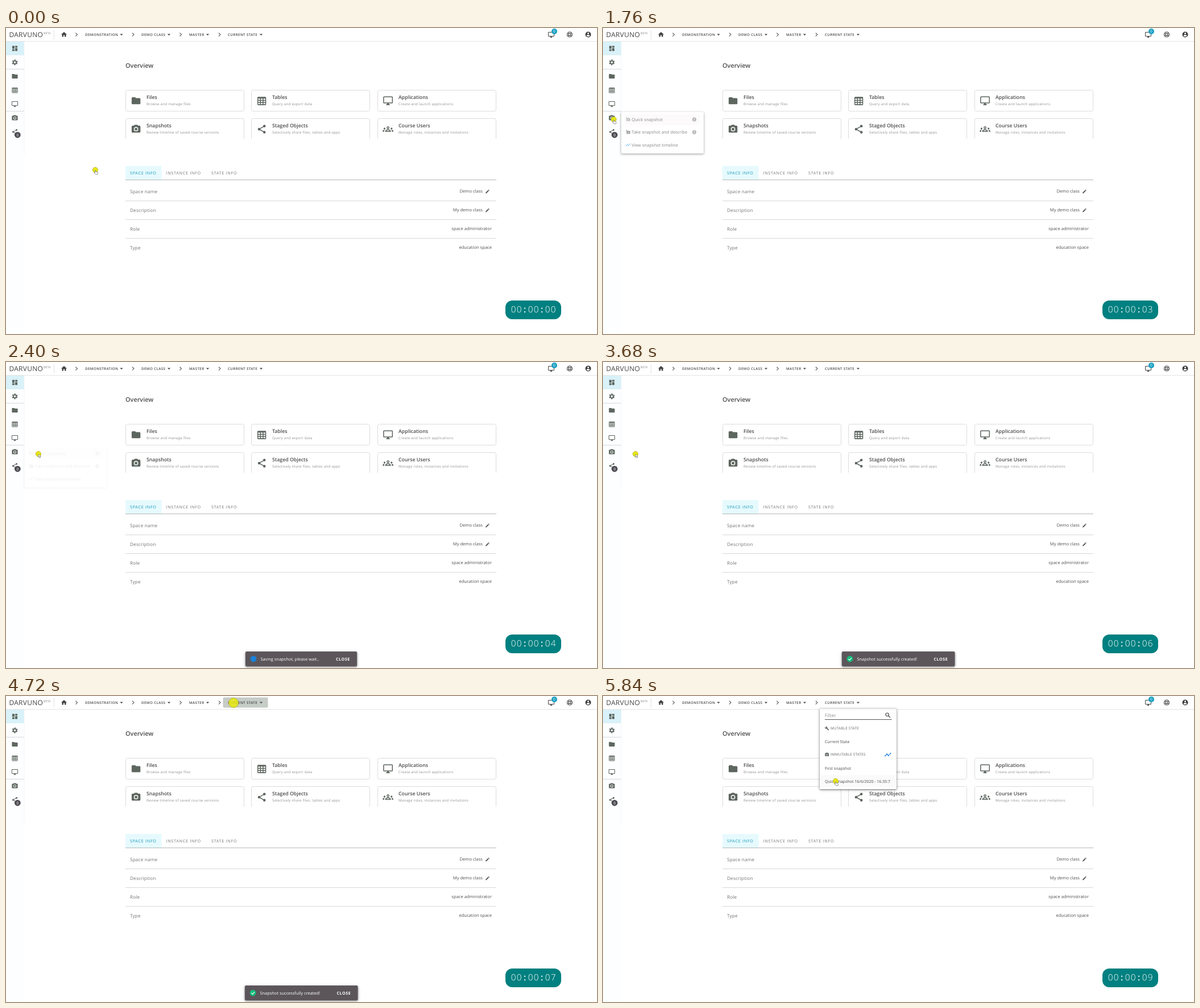
Animation of 1039 by 539 pixels, one loop 6000 ms. Source, as an HTML page:

```html
<!DOCTYPE html>
<html lang="en">
<head>
<meta charset="utf-8">
<title>Course overview</title>
<style>
  html, body { margin: 0; width: 100%; height: 100%; overflow: hidden; background: #fff; }
  svg { display: block; width: 100%; height: 100%; }
  text { font-family: "Open Sans", "Noto Sans", sans-serif; text-rendering: geometricPrecision; white-space: pre; }
  .shadow { filter: drop-shadow(0 1.5px 1.5px rgba(0, 0, 0, .4)) drop-shadow(0 1px 2.5px rgba(0, 0, 0, .25)); }
</style>
</head>
<body>
<svg id="stage" viewBox="0 0 1039 539" preserveAspectRatio="none"></svg>
<script>
const NS = 'http://www.w3.org/2000/svg';
const stage = document.getElementById('stage');
const LOOP = 6000, STEP = 80;
const INK = '#5d665f', DARK = '#4c4c4e';

function add(parent, tag, attrs = {}, content) {
  const el = document.createElementNS(NS, tag);
  for (const key in attrs) el.setAttribute(key, attrs[key]);
  if (content !== undefined) el.textContent = content;
  parent.appendChild(el);
  return el;
}
const group = (parent, attrs) => add(parent, 'g', attrs);
const rect = (parent, x, y, width, height, fill, more) =>
  add(parent, 'rect', { x, y, width, height, fill, ...more });
const circle = (parent, cx, cy, r, fill, more) =>
  add(parent, 'circle', { cx, cy, r, fill, ...more });
const line = (parent, d, stroke, width = 1, more) =>
  add(parent, 'path', { d, stroke, 'stroke-width': width, fill: 'none', ...more });
const label = (parent, x, y, str, size, fill = DARK, more) =>
  add(parent, 'text', { x, y, 'font-size': size, fill, ...more }, str);

// Icons live on a 24 x 24 grid; "f" is filled, "s" stroked with the given width.
const ring = (x, y, r) => `M${x - r} ${y}a${r} ${r} 0 1 0 ${2 * r} 0a${r} ${r} 0 1 0 ${-2 * r} 0z`;
const cells = [7, 12, 17].map(y => [4, 10, 16].map(x => `M${x} ${y}h4v3h-4z`).join('')).join('');
const ICONS = {
  dashboard: { f: 'M3 13h8V3H3zM3 21h8v-6H3zM13 21h8V11h-8zM13 3v6h8V3z' },
  folder: { f: 'M10 4H4q-2 0-2 2v12q0 2 2 2h16q2 0 2-2V8q0-2-2-2h-8z' },
  table: { f: 'M4 3h16q2 0 2 2v15q0 2-2 2H4q-2 0-2-2V5q0-2 2-2z' + cells },
  desktop: { f: 'M21 2H3q-2 0-2 2v12q0 2 2 2h7v2H8v2h8v-2h-2v-2h7q2 0 2-2V4q0-2-2-2zM21 16H3V4h18z' },
  camera: { f: 'M9 2L7.2 4H4q-2 0-2 2v12q0 2 2 2h16q2 0 2-2V6q0-2-2-2h-3.2L15 2z' + ring(12, 12, 5) + ring(12, 12, 3.2) },
  share: { f: ring(18, 5, 3) + ring(6, 12, 3) + ring(18, 19, 3), s: 'M18 5L6 12L18 19', w: 2 },
  people: {
    f: ring(4, 10.5, 2.1) + ring(20, 10.5, 2.1) + 'M0 18v-1.6q0-2.6 4.4-2.9q-1.4 1.3-1.2 4.5zM24 18v-1.6q0-2.6-4.4-2.9q1.4 1.3 1.2 4.5z',
    s: ring(12, 8.8, 2.3) + 'M6.5 17.2v-.8q1-3 5.5-3t5.5 3v.8z', w: 1.8
  },
  home: { f: 'M10 20v-6h4v6h5v-8h3L12 3 2 12h3v8z' },
  account: { f: ring(12, 12, 10) + ring(12, 8, 3) + 'M12 19.2c-2.5 0-4.7-1.3-6-3.2 0-2 4-3.1 6-3.1s6 1.1 6 3.1c-1.3 1.9-3.5 3.2-6 3.2z' },
  buoy: { s: ring(12, 12, 9) + ring(12, 12, 4) + 'M5.6 5.6l3.6 3.6M18.4 5.6l-3.6 3.6M5.6 18.4l3.6-3.6M18.4 18.4l-3.6-3.6', w: 2.3 },
  edit: { f: 'M3 17.2V21h3.8L17.8 9.9l-3.7-3.7zM20.7 7q.6-.7 0-1.4l-2.3-2.3q-.7-.6-1.4 0l-1.9 1.8 3.8 3.8z' },
  search: { s: ring(9.5, 9.5, 5.5) + 'M14 14l6 6', w: 2.2 },
  wrench: { f: 'M22.7 19l-9.1-9.1c.9-2.3.4-5-1.5-6.9-2-2-5-2.4-7.4-1.3L9 6 6 9 1.6 4.7C.4 7.1.9 10.1 2.9 12.1c1.9 1.9 4.6 2.4 6.9 1.5l9.1 9.1q.7.6 1.4 0l2.3-2.3q.6-.7.1-1.4z' },
  timeline: { f: ring(3, 16, 2) + ring(9, 10, 2) + ring(14, 15, 2) + ring(21, 7.5, 2), s: 'M3 16L9 10L14 15L21 7.5', w: 2 },
  gear: { s: ring(12, 12, 5.2), w: 3.4 }
};
function icon(parent, name, cx, cy, scale, color = INK) {
  const g = group(parent, { transform: `translate(${cx} ${cy}) scale(${scale}) translate(-12 -12)` });
  const { f, s, w } = ICONS[name];
  if (f) add(g, 'path', { d: f, fill: color, 'fill-rule': 'evenodd' });
  if (s) line(g, s, color, w);
  if (name === 'gear') {
    circle(g, 12, 12, 8, 'none', { stroke: color, 'stroke-width': 3.6, pathLength: 60, 'stroke-dasharray': '5.5 4.5', transform: 'rotate(13 12 12)' });
  }
  return g;
}
const badge = (x, y, r, fill) => {
  circle(stage, x, y, r, fill);
  label(stage, x, y + 2.4, '0', 6.6, '#fff', { 'text-anchor': 'middle' });
};

function buildPage() {
  rect(stage, 0, 0, 1039, 539, '#fff');

  // sidebar
  rect(stage, 0, 24, 32, 515, '#fcfeff');
  rect(stage, 0, 24, 32, 24, '#d9f1f8');
  line(stage, 'M32 24V225', '#f2f5f5', .8);
  line(stage, 'M0 72.5H32M0 146.5H32', '#d6dada');
  ['dashboard', 'gear', 'folder', 'table', 'desktop', 'camera', 'share'].forEach((name, i) =>
    icon(stage, name, 15.5, 36 + i * 24.5, .51));
  badge(20.3, 188.3, 5.4, '#4d4b52');

  // header
  line(stage, 'M0 23.5H1039', '#e4e4e4');
  line(stage, 'M84.5 4V20', '#e2e2e2');
  label(stage, 5.5, 16, 'DARVUNO', 12, '#444', { 'letter-spacing': .25 });
  label(stage, 66, 10.6, 'BETA', 5.3, '#888');
  icon(stage, 'home', 102, 11.5, .5, '#444');
  icon(stage, 'desktop', 958.5, 12, .5, '#444');
  icon(stage, 'buoy', 991, 11.5, .5, '#444');
  icon(stage, 'account', 1023.5, 11.5, .5, '#3f3f3f');
  badge(964, 6, 5, '#189fc2');

  // overview cards
  label(stage, 210, 70.3, 'Overview', 10.9, DARK, { 'font-weight': 600 });
  [
    ['folder', 'Files', 'Browse and manage files'],
    ['table', 'Tables', 'Query and export data'],
    ['desktop', 'Applications', 'Create and launch applications'],
    ['camera', 'Snapshots', 'Review timeline of saved course versions'],
    ['share', 'Staged Objects', 'Selectively share files, tables and apps'],
    ['people', 'Course Users', 'Manage roles, instances and invitations']
  ].forEach(([name, title, hint], i) => {
    const x = Math.round(210 + (i % 3) * 221.4), low = i > 2, y = low ? 159.5 : 109.5;
    if (low) line(stage, `M${x + .5} 195V${y + 3}q0-3 3-3h202q3 0 3 3V195`, '#dcdcdc');
    else rect(stage, x + .5, y, 208, 37, '#fff', { rx: 3, stroke: '#dcdcdc' });
    icon(stage, name, x + 18.6, y + 18.7, .77);
    label(stage, x + 37, y + 15.7, title, 8.75, DARK, { 'font-weight': 600 });
    label(stage, x + 37, y + 26, hint, 6.2, '#8e8e8e', { 'letter-spacing': .25 });
  });

  // info table
  rect(stage, 210, 243, 63.5, 24, '#e6fafe');
  line(stage, 'M210 267.5H862', '#b4b8b8');
  [[218, 'SPACE INFO', '#1697b5'], [281.5, 'INSTANCE INFO', '#777'], [361, 'STATE INFO', '#777']]
    .forEach(([x, str, color]) => label(stage, x, 257.8, str, 7.2, color, { 'letter-spacing': .72 }));
  [
    ['Space name', 'Demo class', true],
    ['Description', 'My demo class', true],
    ['Role', 'space administrator'],
    ['Type', 'education space']
  ].forEach(([key, value, editable], i) => {
    const y = 291 + i * 33;
    label(stage, 218, y, key, 8.1, '#707070', { 'letter-spacing': .22 });
    label(stage, editable ? 838 : 854, y - .8, value, 7.6, '#505050', { 'text-anchor': 'end' });
    if (editable) icon(stage, 'edit', 846.5, y - 3, .37, '#555');
    if (i < 3) line(stage, `M210 ${y + 13.5}H862`, '#d8d8d8');
  });
}

function buildCrumbs() {
  const hover = rect(stage, 381.5, 2.5, 79, 18, '#c6ccc6', { rx: 2 });
  [[124, 139, 'DEMONSTRATION', 203], [223.5, 238, 'DEMO CLASS', 286.5], [307, 322, 'MASTER', 354.5], [375.5, 390, 'CURRENT STATE', 448.5]]
    .forEach(([sep, x, str, caret]) => {
      line(stage, `M${sep - 1.6} 8.6l3 3l-3 3`, '#555', 1.1);
      label(stage, x, 13.6, str, 6.2, '#484848', { 'letter-spacing': .4, 'font-weight': 600 });
      add(stage, 'path', { d: `M${caret - 2.6} 10.4h5.2l-2.6 2.8z`, fill: '#484848' });
    });
  return hover;
}

function buildMenu() {
  const g = group(stage);
  rect(g, 32, 148, 145, 73, '#fff', { rx: 1.5, class: 'shadow' });
  rect(g, 38, 152, 133, 19, '#fbf9f9');
  ['Quick snapshot', 'Take snapshot and describe', 'View snapshot timeline'].forEach((str, i) => {
    const y = 161.2 + i * 22.4;
    label(g, 50.3, y + 2.8, str, 7.58, '#505050');
    if (i === 2) return icon(g, 'timeline', 44, y, .38, '#1e88e5');
    const tone = i ? INK : '#959b96';
    icon(g, 'camera', 44.5, y + .4, .31, tone);
    line(g, `M40 ${y - 3}h2.4M41.2 ${y - 4.2}v2.4`, tone, .7);
    circle(g, 160.5, y, 3.6, '#9a9a9a');
    line(g, `M160.5 ${y - 2}v1M160.5 ${y - .4}v2.4`, '#fff', .8);
  });
  return g;
}

function buildDropdown() {
  const g = group(stage);
  rect(g, 381, 22, 135, 142, '#fff', { rx: 1.5, class: 'shadow' });
  rect(g, 381, 22, 135, 1.5, '#e8e8e8');
  const row = rect(g, 381, 139.5, 135, 21, '#fafafa');
  label(g, 390, 37, 'Filter', 8, '#8a8a8a', { 'letter-spacing': .2 });
  line(g, 'M390 41.5H507.5', '#555');
  icon(g, 'search', 501, 34, .5, '#444');
  const caret = line(g, 'M389.8 29V39.5', '#444', .8);
  icon(g, 'wrench', 393.7, 57, .33);
  icon(g, 'camera', 393.7, 103.2, .34);
  icon(g, 'timeline', 500.8, 103.4, .52, '#2383e8');
  label(g, 400, 59.3, 'MUTABLE STATE', 6.4, '#666', { 'letter-spacing': .2 });
  label(g, 400, 105.4, 'IMMUTABLE STATES', 6.4, '#666', { 'letter-spacing': .2 });
  [[82.6, 'Current State'], [130.2, 'First snapshot'], [152.7, 'Quick snapshot 16/6/2020 - 16:35:7']]
    .forEach(([y, str]) => label(g, 390, y, str, 7, '#484848'));
  return { g, row, caret };
}

function buildToast(x, width, color, str, done) {
  const g = group(stage);
  rect(g, x, 510, width, 26, '#5c565b', { rx: 2, class: 'shadow' });
  circle(g, x + 14, 523, 5.4, color);
  if (done) line(g, `M${x + 11.4} 523.2l1.9 1.9l3.6-3.8`, '#fff', 1.2);
  label(g, x + 26.4, 525.6, str, 7.45, '#fff');
  label(g, x + width - 37, 525.6, 'CLOSE', 7.2, '#fff', { 'font-weight': 700, 'letter-spacing': .5 });
  return g;
}

function buildTimer() {
  rect(stage, 878, 480, 98, 33, '#008080', { rx: 12 });
  return Array.from({ length: 8 }, (_, i) =>
    label(stage, 892.2 + i * 10, 500.5, i % 3 === 2 ? ':' : '0', 15.4, '#fff',
      { 'text-anchor': 'middle', 'font-weight': i % 3 === 2 ? 600 : 300 }));
}

function buildCursor() {
  const g = group(stage);
  const shape = { fill: '#fff', stroke: '#666', 'stroke-width': .7, 'stroke-linejoin': 'round' };
  const dot = circle(g, 0, 0, 4.6, '#e8ea10', { stroke: '#b0a52c', 'stroke-width': .8 });
  const arrow = add(g, 'path', { d: 'M0 0v6l1.4-1.2l1 2.1l1-.5l-1-2h1.9z', ...shape });
  const hand = add(g, 'path', { d: 'M-.7 5V1q.7-1 1.4 0v2l3 .7q.8.3.7 1.2l-.6 3H.7L-2 5q0-1 1.3 0z', ...shape });
  return { g, dot, arrow, hand };
}

buildPage();
const crumbHover = buildCrumbs();
const menu = buildMenu();
const dropdown = buildDropdown();
const saving = buildToast(421, 196, '#1b80d8', 'Saving snapshot, please wait..');
const saved = buildToast(420, 198.5, '#16bd7c', 'Snapshot successfully created!', true);
const digits = buildTimer();
const cursor = buildCursor();

const PATH = [
  [0, 157, 250], [880, 157, 250], [1360, 94, 167], [1520, 20, 161], [1920, 18, 161],
  [2080, 57, 162], [3840, 57, 162], [4320, 388, 22], [4400, 388, 22], [4480, 400, 12],
  [5040, 400, 12], [5440, 409, 150], [LOOP, 409, 150]
];
const CLICKS = [1640, 2280, 4720];

const ramp = (t, from, to) => Math.min(1, Math.max(0, (t - from) / (to - from)));
const within = (t, from, to) => t >= from && t < to;
const show = (el, opacity) => {
  el.setAttribute('opacity', +opacity);
  el.setAttribute('display', +opacity ? 'inline' : 'none');
};
function locate(t) {
  const i = PATH.findIndex(p => p[0] > t);
  const [t0, x0, y0] = PATH[i - 1], [t1, x1, y1] = PATH[i];
  const k = ramp(t, t0, t1);
  return [x0 + (x1 - x0) * k, y0 + (y1 - y0) * k];
}

function draw(ms) {
  const t = Math.floor((ms % LOOP) / STEP) * STEP;

  const clock = '00:00:' + String(Math.floor((t + 160) / 640)).padStart(2, '0');
  digits.forEach((el, i) => { el.textContent = clock[i]; });

  show(menu, ramp(t, 1600, 1840) * (1 - ramp(t, 2160, 2420)));
  show(crumbHover, within(t, 4480, 5120));
  show(dropdown.g, ramp(t, 4720, 4960));
  show(dropdown.row, t >= 5440);
  show(dropdown.caret, within(t, 4800, 5120) || within(t, 5440, 5760));
  show(saving, t < 2520 ? ramp(t, 2240, 2400) : 0);
  show(saved, t >= 2520 ? 1 - ramp(t, 5680, 5840) : 0);

  const [x, y] = locate(t);
  const pulse = Math.max(...CLICKS.map(c => 1 - ramp(Math.abs(t - c), 0, 120)));
  cursor.g.setAttribute('transform', `translate(${x} ${y})`);
  cursor.dot.setAttribute('r', 4.6 + 3.9 * pulse);
  cursor.dot.setAttribute('fill-opacity', 1 - .15 * pulse);
  const pointing = t < 640 || within(t, 1520, 2320) || within(t, 4480, 5040) || t >= 5440;
  show(cursor.hand, pointing && pulse < .9);
  show(cursor.arrow, !pointing);
}

const start = performance.now();
function tick() {
  draw(performance.now() - start);
  requestAnimationFrame(tick);
}
tick();
</script>
</body>
</html>
```
